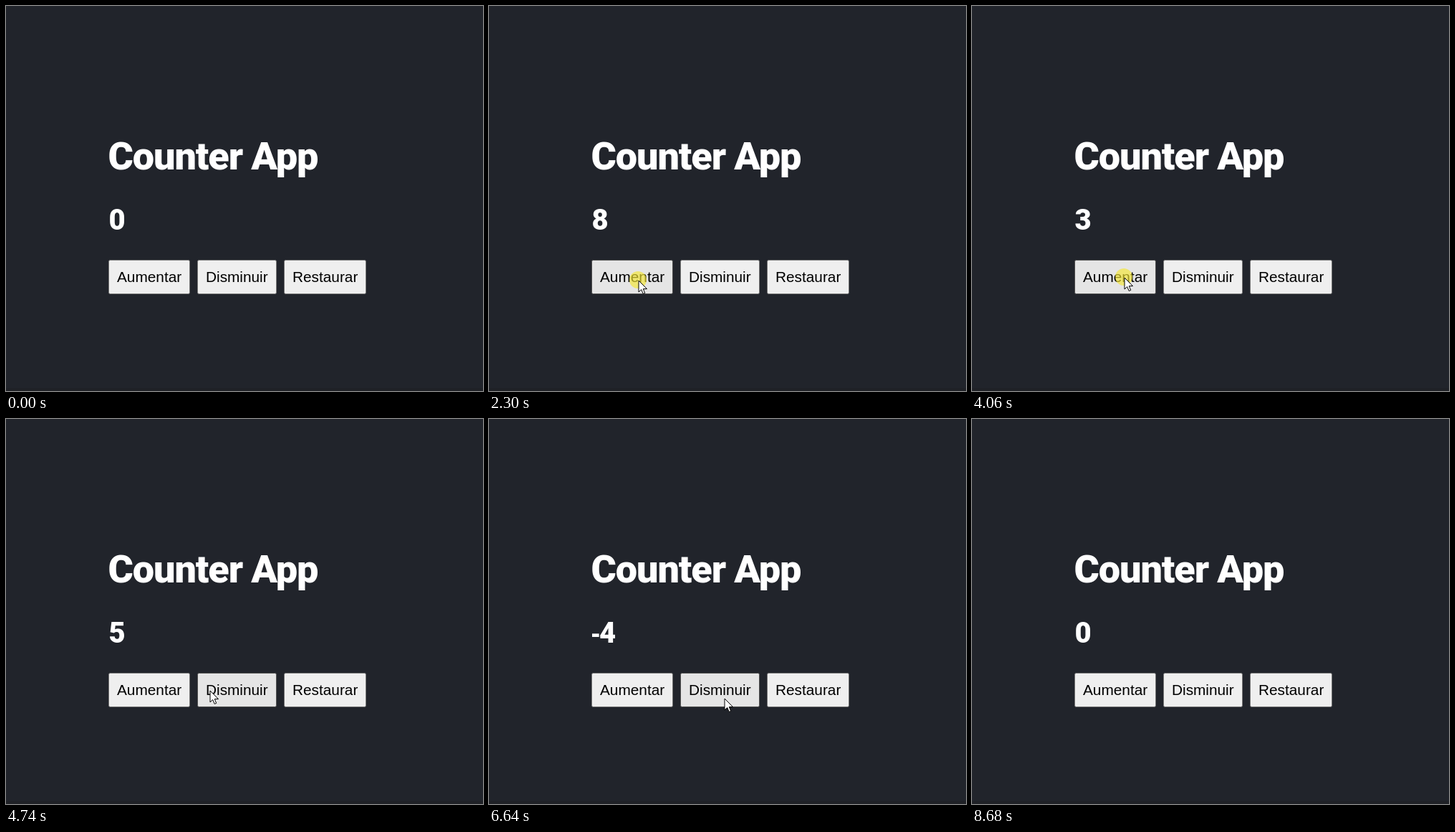
Recreate the animation shown at these times as an HTML page with a canvas. Size 666 by 537 pixels, loop 9.01 s.

```html
<!DOCTYPE html>
<html lang="es">
<head>
<meta charset="utf-8">
<title>Counter App</title>
<style>
  html, body { margin: 0; width: 100%; height: 100%; overflow: hidden; background: #21242b; }
  canvas { display: block; }
</style>
</head>
<body>
<canvas id="stage" width="666" height="537"></canvas>
<script>
const ctx = document.getElementById('stage').getContext('2d');
const LOOP = 9010, FIRST = 190, GONE = 8660, STEP = 67.8;
const TOP = 354, HEIGHT = 48, PAD = 12, GAP = 10;
const BUTTON_FONT = '20.8px "Liberation Sans", Arial, sans-serif';
const TITLE_FONT = '900 54px Roboto, sans-serif';
const COUNT_FONT = '900 40px Roboto, sans-serif';
const MINUS_FONT = 'bold 38px "Liberation Sans", Arial, sans-serif';

// each button is as wide as its label plus padding
ctx.font = BUTTON_FONT;
let left = 143;
const buttons = ['Aumentar', 'Disminuir', 'Restaurar'].map(label => {
  const w = ctx.measureText(label).width + 2 * PAD;
  const button = { label, x: Math.round(left), w: Math.round(w) };
  left += w + GAP;
  return button;
});

const entry = { x: 572, y: 524 };
const moves = [
  { from: FIRST, to: 820, x: 208, y: 382 },
  { from: 2380, to: 2740, x: 440, y: 381 },
  { from: 3070, to: 3460, x: 212, y: 378 },
  { from: 4500, to: 4900, x: 328, y: 389 },
  { from: 7190, to: 7530, x: 436, y: 380 },
  { from: 8320, to: GONE, x: 602, y: 530 }
];
const BOW = 7;

const add = n => n + 1, subtract = n => n - 1, reset = () => 0;
const runs = [
  { start: 1000, every: 183, times: 8, apply: add },
  { start: 2900, every: 0, times: 1, apply: reset },
  { start: 3630, every: 200, times: 5, apply: add },
  { start: 4990, every: 187, times: 5, apply: subtract },
  { start: 6000, every: 190, times: 7, apply: subtract },
  { start: 7750, every: 0, times: 1, apply: reset }
];
const clicks = runs.flatMap(({ start, every, times, apply }) =>
  Array.from({ length: times }, (_, i) => ({ time: start + i * every, apply })));

// eased moves with a slight upward bow
function pointerAt(t) {
  let { x, y } = entry;
  for (const move of moves) {
    const u = Math.max(0, Math.min(1, (t - move.from) / (move.to - move.from)));
    const ease = u * u * (3 - 2 * u);
    x += (move.x - x) * ease;
    y += (move.y - y) * ease - BOW * Math.sin(Math.PI * u);
  }
  return { x: Math.round(x), y: Math.round(y) };
}

function text(string, x, y, font, color, spacing = '0px') {
  ctx.font = font;
  ctx.letterSpacing = spacing;
  ctx.fillStyle = color;
  ctx.fillText(string, x, y);
}

function drawButton({ label, x, w }, hovered, pressed) {
  ctx.beginPath();
  ctx.roundRect(x + 0.5, TOP + 0.5, w - 1, HEIGHT - 1, 2);
  ctx.fillStyle = pressed ? '#f5f5f5' : hovered ? '#e5e5e5' : '#efefef';
  ctx.fill();
  ctx.lineWidth = 1;
  ctx.strokeStyle = hovered ? '#4f4f4f' : '#767676';
  ctx.stroke();
  text(label, x + PAD, 385, BUTTON_FONT, '#000');
}

function drawCount(n) {
  if (n < 0) text('-', 142.5, 311.5, MINUS_FONT, '#fff');
  text(String(Math.abs(n)), n < 0 ? 154 : 143.5, 311.5, COUNT_FONT, '#fff');
}

function drawPointer({ x, y }, clicking) {
  if (clicking) {
    ctx.beginPath();
    ctx.arc(x, y, 12, 0, Math.PI * 2);
    ctx.fillStyle = 'rgba(245, 230, 50, 0.65)';
    ctx.fill();
  }
  ctx.save();
  ctx.translate(x + 1, y + 1);
  ctx.fillStyle = '#fff';
  ctx.strokeStyle = '#000';
  ctx.lineWidth = 1;
  const arrow = new Path2D('M0 0V16L3.7 12.5L6.2 18.4L8.7 17.4L6.3 11.6H11.5Z');
  ctx.fill(arrow);
  ctx.stroke(arrow);
  ctx.restore();
}

function draw(elapsed) {
  const t = elapsed < FIRST ? 0 : FIRST + Math.floor((elapsed - FIRST) / STEP) * STEP;
  const visible = t >= FIRST && t < GONE;
  const hover = pointerAt(t - 20);
  const count = clicks.reduce((n, c) => t >= c.time ? c.apply(n) : n, 0);
  const pressed = clicks.some(c => t >= c.time - 60 && t < c.time);
  const clicking = clicks.some(c => t >= c.time - 60 && t < c.time + 55);

  ctx.fillStyle = '#21242b';
  ctx.fillRect(0, 0, 666, 537);
  ctx.fillStyle = '#1f2126';
  ctx.fillRect(0, 533, 666, 4);

  text('Counter App', 142.5, 227.5, TITLE_FONT, '#fff', '-1.1px');
  drawCount(count);
  for (const b of buttons) {
    const over = visible && hover.x >= b.x && hover.x < b.x + b.w &&
      hover.y >= TOP && hover.y < TOP + HEIGHT;
    drawButton(b, over, over && pressed);
  }
  if (visible) drawPointer(pointerAt(t), clicking);
}

const start = performance.now();
function tick() {
  draw((performance.now() - start) % LOOP);
  requestAnimationFrame(tick);
}
tick();
</script>
</body>
</html>
```
